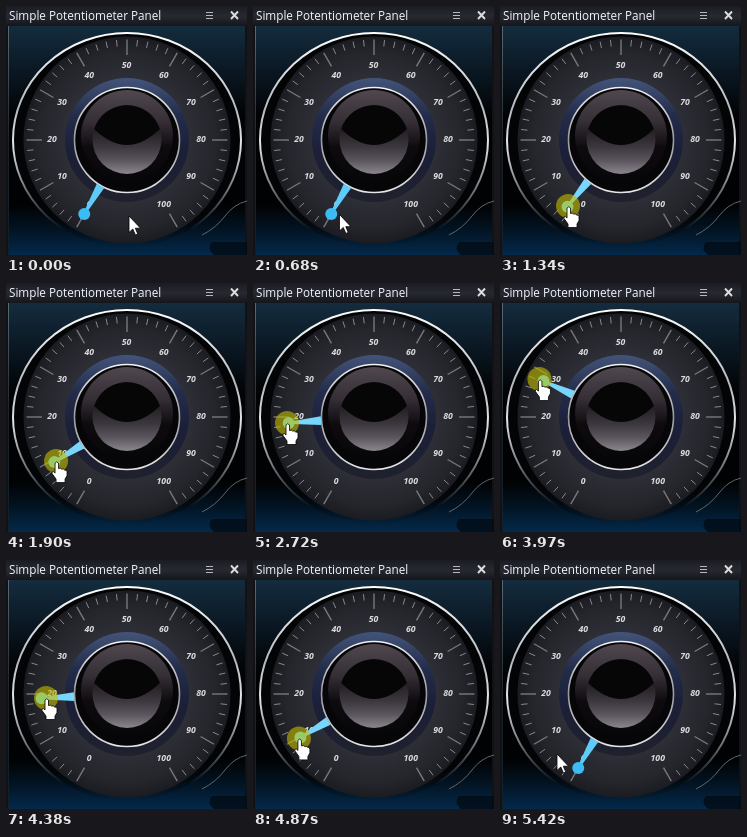
An HTML page for the animation above (5.82 s loop, 241 by 249 pixels).

```html
<!DOCTYPE html>
<html lang="en">
<head>
<meta charset="utf-8">
<title>Potentiometer</title>
<style>
html, body { margin: 0; width: 100%; height: 100%; overflow: hidden; background: #000; }
svg { display: block; width: 100vw; height: 100vh; }
text { font-family: "Open Sans", "Noto Sans", sans-serif; fill: #f4f6ff; }
#labels text { font-size: 8.7px; font-style: italic; font-weight: 700; text-anchor: middle; fill: #dcdcde; }
</style>
</head>
<body>
<svg viewBox="0 0 241 249">
  <defs>
    <linearGradient id="back" x2="0" y2="1">
      <stop offset="0" stop-color="#142c3e"/><stop offset=".2" stop-color="#0a1722"/>
      <stop offset=".4" stop-color="#010203"/><stop offset=".78" stop-color="#010203"/>
      <stop offset=".88" stop-color="#021220"/><stop offset="1" stop-color="#04294a"/>
    </linearGradient>
    <linearGradient id="edge" x2="0" y2="1">
      <stop offset="0" stop-color="#5c6a74"/><stop offset=".5" stop-color="#1c2226"/>
      <stop offset="1" stop-color="#10202c"/>
    </linearGradient>
    <linearGradient id="well" x2="0" y2="1">
      <stop offset=".8" stop-color="#030405"/><stop offset="1" stop-color="#030405" stop-opacity="0"/>
    </linearGradient>
    <linearGradient id="rim" x2="0" y2="1">
      <stop offset="0" stop-color="#fff"/><stop offset=".35" stop-color="#b4b8bc"/>
      <stop offset=".52" stop-color="#e4e6e8"/><stop offset=".74" stop-color="#6c7177"/>
      <stop offset=".92" stop-color="#6c7177" stop-opacity="0"/>
    </linearGradient>
    <radialGradient id="dial">
      <stop offset=".55" stop-color="#2f3038"/><stop offset=".85" stop-color="#25262c"/>
      <stop offset="1" stop-color="#1b1c21"/>
    </radialGradient>
    <linearGradient id="halo" x2="0" y2="1">
      <stop offset="0" stop-color="#43547a"/><stop offset=".3" stop-color="#232c4a"/>
      <stop offset=".6" stop-color="#1b1f38"/><stop offset="1" stop-color="#1f212c"/>
    </linearGradient>
    <linearGradient id="ring" x2="0" y2="1">
      <stop offset="0" stop-color="#f2f2f2"/><stop offset=".5" stop-color="#9a9a9e"/>
      <stop offset="1" stop-color="#e6e6e6"/>
    </linearGradient>
    <linearGradient id="dome" x2="0" y2="1">
      <stop offset="0" stop-color="#50474f"/><stop offset=".35" stop-color="#352e35"/>
      <stop offset=".62" stop-color="#0e0b0e"/><stop offset="1" stop-color="#060608"/>
    </linearGradient>
    <linearGradient id="cap" x2="0" y2="1">
      <stop offset=".3" stop-color="#1c191d"/><stop offset=".6" stop-color="#3b363d"/>
      <stop offset=".8" stop-color="#5a545c"/><stop offset="1" stop-color="#8b858d"/>
    </linearGradient>
    <linearGradient id="bar" x2="0" y2="1">
      <stop offset="0" stop-color="#1b1c23"/><stop offset=".5" stop-color="#272932"/>
      <stop offset="1" stop-color="#15161b"/>
    </linearGradient>
  </defs>

  <rect width="241" height="249" fill="#101216"/>
  <rect x="2" y="20" width="237" height="229" fill="url(#back)"/>
  <rect x="2" y="20" width="1" height="229" fill="url(#edge)"/>
  <path d="M241 195Q228 198 219 210T196 229" fill="none" stroke="#5f656b"/>
  <path d="M206 236H241V249H208Q200 243 206 236Z" fill="#020a12" opacity=".75"/>
  <rect width="241" height="20" fill="url(#bar)"/>
  <text x="3" y="14" font-size="11.7">Simple Potentiometer Panel</text>
  <path d="M200 6.5h7M200 9.5h7M200 12.5h7" stroke="#b8b8bc"/>
  <path d="M225 5.5l7 7.5M232 5.5l-7 7.5" stroke="#ddd" stroke-width="1.9"/>

  <ellipse cx="121" cy="134" rx="114" ry="107" fill="url(#well)" stroke="url(#rim)" stroke-width="2"/>
  <circle cx="121" cy="134" r="103.5" fill="url(#dial)"/>
  <g id="ticks"></g>
  <g id="labels"></g>
  <circle cx="121" cy="134" r="62" fill="url(#halo)"/>
  <circle cx="121" cy="134" r="52.5" fill="#060608" stroke="url(#ring)" stroke-width="1.6"/>
  <circle cx="121" cy="130" r="46" fill="url(#dome)"/>
  <circle cx="121" cy="133.5" r="34.5" fill="url(#cap)"/>
  <path d="M88.2 123A34.5 34.5 0 0 1 153.8 123Q121 155 88.2 123Z" fill="#060607"/>

  <path id="needle" d="M-4.3-53L-1.4-82H1.4L4.3-53Z"/>
  <circle id="knob" r="6"/>
  <circle id="press" r="12" fill="#c3bd00" opacity=".6"/>
  <g id="cursor" fill="#fff" stroke="#000" stroke-width=".8">
    <path id="arrow" d="M0 0V16.5L3.8 13L6.4 19L8.8 18L6.3 12.2H11.5Z"/>
    <path id="hand" transform="translate(1 .5)" d="M-2 1.5q1.6-2.5 3.5 0V7l2-.3 1 .8 2 0 1 .9 1.5.2 1 1.5V14l-2 3.5V21H-1v-3.5L-5 12q-.5-2.5 1.3-2L-2 11.5Z"/>
  </g>
</svg>
<script>
const CX = 121, CY = 134, LOOP = 5820, PRESS = 1000, DRAG = 1196, RELEASE = 5416;
const $ = id => document.getElementById(id);
const polar = (deg, r) => {
  const a = deg * Math.PI / 180;
  return [CX + r * Math.sin(a), CY - r * Math.cos(a)];
};

let ticks = '', labels = '';
for (let v = 0; v <= 100; v += 2) {
  const deg = v * 3 - 150, major = v % 10 === 0;
  const [x1, y1] = polar(deg, major ? 85 : 94), [x2, y2] = polar(deg, 100.5);
  ticks += `<path d="M${x1} ${y1}L${x2} ${y2}" stroke="${major ? '#77777c' : '#88888c'}" stroke-width="${major ? 1.4 : 1}"/>`;
  if (major) {
    const [x, y] = polar(deg, 74.5);
    labels += `<text x="${x - .5}" y="${y + 2.2}">${v}</text>`;
  }
}
$('ticks').innerHTML = ticks;
$('labels').innerHTML = labels;

// Cursor path: time, x, y
const path = [
  [190, 123, 210], [808, 76, 208], [1127, 76, 208], [1335, 68, 200], [1750, 53, 183],
  [1890, 50, 178], [2380, 38, 156], [2718, 34, 140], [2980, 30, 117], [3410, 34, 88],
  [3610, 38, 82], [3760, 39, 80], [4240, 40, 118], [4378, 40, 138],
  [4870, 46, 179], [5348, 57, 194]
];

function cursorAt(t) {
  const i = path.findIndex(k => k[0] > t);
  if (i === 0) return path[0].slice(1);
  if (i < 0) return path[path.length - 1].slice(1);
  const [t0, x0, y0] = path[i - 1], [t1, x1, y1] = path[i], f = (t - t0) / (t1 - t0);
  return [x0 + (x1 - x0) * f, y0 + (y1 - y0) * f];
}

// The pointer is sampled in steps of about 69 ms
function stepped(t) {
  const [start, size] = t < DRAG ? [258, 68.75] : [DRAG, 69.18];
  return t < start ? 0 : start + Math.floor((t - start) / size) * size;
}

const show = (el, on) => el.setAttribute('visibility', on ? 'visible' : 'hidden');
const move = (el, [x, y]) => el.setAttribute('transform', `translate(${x} ${y})`);

function draw(now) {
  const t = now % LOOP;
  const pos = cursorAt(stepped(t));
  const pressed = t >= PRESS && t < RELEASE;
  const dragging = t >= DRAG && t < RELEASE;
  const deg = dragging ? Math.max(-150, Math.atan2(pos[0] - CX, CY - pos[1]) * 180 / Math.PI) : -150;
  const tip = polar(deg, 85.5);
  const hover = pressed || Math.hypot(pos[0] - tip[0], pos[1] - tip[1]) < 6;

  $('needle').setAttribute('transform', `translate(${CX} ${CY}) rotate(${deg})`);
  $('needle').setAttribute('fill', hover ? '#78d6fc' : '#5ecbfa');
  move($('knob'), tip);
  $('knob').setAttribute('fill', hover ? '#5cdcff' : '#3cbcf4');
  move($('press'), pos);
  show($('press'), pressed);
  move($('cursor'), pos);
  show($('hand'), hover);
  show($('arrow'), !hover);
  requestAnimationFrame(() => draw(performance.now()));
}
draw(performance.now());
</script>
</body>
</html>
```
